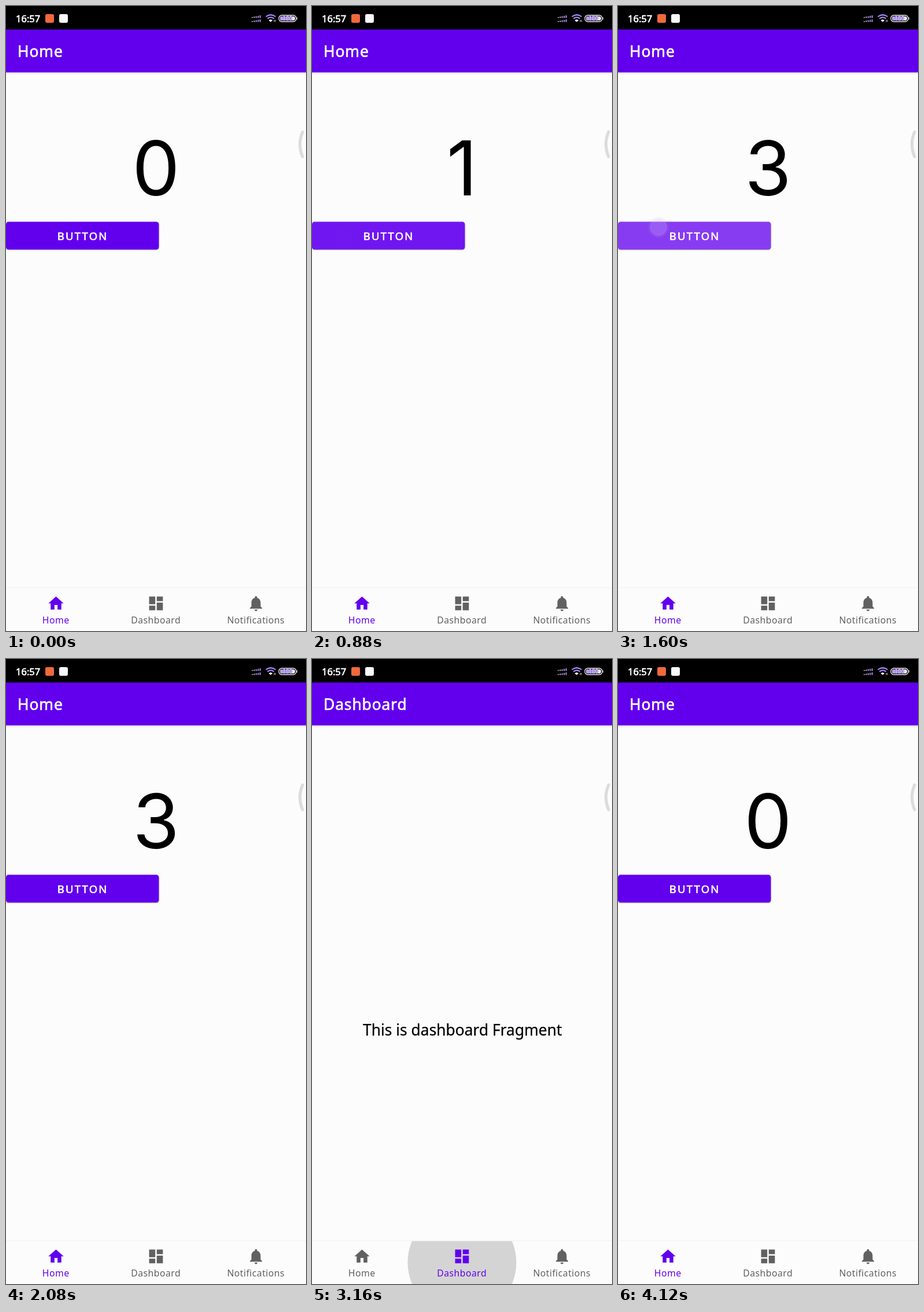
An HTML page for the animation above (4.68 s loop, 519 by 1079 pixels).

```html
<!DOCTYPE html>
<html lang="en">
<head>
<meta charset="utf-8">
<style>
html, body { margin: 0; width: 100%; height: 100%; overflow: hidden; background: #fcfcfc; }
svg { display: block; width: 519px; height: 1079px; font-family: "Noto Sans", sans-serif; }
.medium { fill: #fff; stroke: #fff; stroke-width: .7; }
#title { font-size: 26.4px; letter-spacing: .9px; }
#count { font: 130.6px Inter, sans-serif; text-anchor: middle; }
#message { font-size: 26.4px; stroke: #000; stroke-width: .25; }
.caption { font-size: 18.5px; letter-spacing: 2.2px; }
.tab { font-size: 15.86px; letter-spacing: .4px; text-anchor: middle; }
</style>
</head>
<body>
<svg viewBox="0 0 519 1079">
  <defs>
    <clipPath id="buttonClip"><rect y="372.5" width="264.5" height="48" rx="4.5"/></clipPath>
    <clipPath id="navClip"><rect y="1005" width="519" height="74"/></clipPath>
    <linearGradient id="shade" x2="0" y2="1">
      <stop stop-opacity=".12"/><stop offset="1" stop-opacity="0"/>
    </linearGradient>
    <filter id="soft"><feGaussianBlur stdDeviation="1"/></filter>
  </defs>
  <rect width="519" height="1079" fill="#fcfcfc"/>

  <g id="home">
    <text id="count" x="259.5" y="327.3">0</text>
    <rect y="374" width="264.5" height="47" rx="4.5" opacity=".3" filter="url(#soft)"/>
    <rect y="372.5" width="264.5" height="48" rx="4.5" fill="#6200ee"/>
    <g id="ripples" clip-path="url(#buttonClip)" fill="#fff"></g>
    <text class="medium caption" x="88.8" y="404">BUTTON</text>
    <g id="touches"></g>
  </g>
  <text id="message" x="88" y="649.5">This is dashboard Fragment</text>

  <rect y="114.6" width="519" height="4" fill="url(#shade)"/>
  <rect y="40" width="519" height="74.6" fill="#6200ee"/>
  <text id="title" class="medium" x="20" y="88">Home</text>

  <rect width="519" height="40.6"/>
  <text class="medium" x="17" y="28" font-size="16.5">16:57</text>
  <rect x="68" y="14" width="15" height="15" rx="3" fill="#f2693a"/>
  <rect x="92" y="14" width="15" height="15" rx="3" fill="#fafafa"/>
  <g id="signal"></g>
  <g fill="none" stroke="#a583f0" stroke-width="2.2">
    <path d="M449.5 18.5q8.5-6.5 17 0M452.3 21.8q5.7-4.4 11.4 0" />
    <path d="M455 24.8q2.8-2.2 5.6 0L457.8 27z" fill="#fff" stroke="#fff" stroke-width="1"/>
    <path d="M464 24v3.5m2-3.5v3.5" stroke="#ccc" stroke-width="1"/>
  </g>
  <rect x="472" y="16" width="30" height="11" rx="5" fill="none" stroke="#eee" stroke-width="1.3"/>
  <rect x="474" y="18" width="26" height="7" rx="3" fill="#f4f0fc"/>
  <rect x="474" y="18" width="20" height="7" rx="3" fill="#b79bf0"/>
  <path d="M503.4 19.5v4" stroke="#eee"/>
  <text x="487" y="25.3" font-size="10" text-anchor="middle" fill="#fff" stroke="#6a45b5" stroke-width="1" paint-order="stroke">100</text>

  <path d="M513 217.5Q504 239 513 260" fill="none" stroke="#dcdcdc" stroke-width="5.2" stroke-linecap="round"/>

  <rect y="1003.5" width="519" height="1.3" fill="#f4f4f4"/>
  <rect y="1005" width="519" height="74" fill="#fcfcfc"/>
  <g id="navRipples" clip-path="url(#navClip)"></g>
  <g id="tabs"></g>
</svg>
<script>
const LOOP = 4680, PURPLE = '#6200ee', GREY = '#616161';
const buttonTaps = [[520, 54, 399], [1040, 62, 382], [1390, 70, 382]];
const navTaps = [[2920, 259.5], [3560, 86.5]];
const SHOW_DASHBOARD = 3080, SHOW_HOME = 3720;
const icons = [
  ['Home', 86.5, 'M10 20v-6h4v6h5v-8h3L12 3 2 12h3v8z'],
  ['Dashboard', 259.5, 'M3 13h8V3H3zm0 8h8v-6H3zm10 0h8V11h-8zm0-18v6h8V3z'],
  ['Notifications', 432.5, 'M12 22c1.1 0 2-.9 2-2h-4c0 1.1.89 2 2 2zm6-6v-5c0-3.07-1.64-5.64-4.5-6.32V4c0-.83-.67-1.5-1.5-1.5s-1.5.67-1.5 1.5v.68C7.63 5.36 6 7.92 6 11v5l-2 2v1h16v-1z']
];

const $ = id => document.getElementById(id);
const set = (el, attrs) => { for (const k in attrs) el.setAttribute(k, attrs[k]); };
function add(parent, tag, attrs = {}) {
  const el = document.createElementNS('http://www.w3.org/2000/svg', tag);
  set(el, attrs);
  return parent.appendChild(el);
}
const progress = (t, start, length) => Math.min(1, Math.max(0, (t - start) / length));
const easeOut = p => 1 - (1 - p) ** 1.6;

for (let row = 0; row < 2; row++)
  for (let i = 0; i < 5; i++)
    add($('signal'), 'rect', {
      x: 425 + i * 3.4, y: 19 - i * .7 + row * 7, width: 2.2, height: 1.6 + i * .7,
      fill: i < 2 ? '#aaa6b5' : '#9b80d6'
    });

const tabs = icons.map(([name, x, d]) => {
  const tab = add($('tabs'), 'g');
  add(tab, 'path', { d, transform: `translate(${x - 15.86} 1015.5) scale(1.3217)` });
  add(tab, 'text', { class: 'tab', x: x - .3, y: 1065.5 }).textContent = name;
  return tab;
});
const ripples = buttonTaps.map(() => add($('ripples'), 'circle'));
const touches = buttonTaps.map(([, x, y]) => {
  const g = add($('touches'), 'g');
  add(g, 'circle', { cx: x, cy: y, r: 15.5, fill: 'none', stroke: '#bba8de', 'stroke-width': 3, opacity: .35, filter: 'url(#soft)' });
  add(g, 'circle', { cx: x, cy: y, r: 13.7, fill: '#c9a9fa', 'fill-opacity': .55, stroke: '#d8d0e6', 'stroke-opacity': .5 });
  return g;
});
const navRipples = navTaps.map(([, cx]) => add($('navRipples'), 'circle', { cx, cy: 1042, fill: '#000' }));

function draw(t) {
  const dashboard = t >= SHOW_DASHBOARD && t < SHOW_HOME;
  const active = dashboard ? 1 : 0;
  $('home').style.display = dashboard ? 'none' : '';
  $('message').style.display = dashboard ? '' : 'none';
  $('title').textContent = icons[active][0];
  tabs.forEach((tab, i) => set(tab, { fill: i === active ? PURPLE : GREY }));
  $('count').textContent = t >= SHOW_HOME ? 0 : buttonTaps.filter(([start]) => t >= start + 150).length;

  buttonTaps.forEach(([start, x, y], i) => {
    const p = easeOut(progress(t, start, 160));
    set(ripples[i], {
      cx: x + (132 - x) * p, cy: y + (397 - y) * p, r: 136 * p,
      opacity: .235 * (1 - progress(t, start + 220, 220))
    });
    set(touches[i], { opacity: progress(t, start, 40) * (1 - progress(t, start + 140, 260)) ** 2 });
  });
  navTaps.forEach(([start], i) => set(navRipples[i], {
    r: 94 * easeOut(progress(t, start, 200)),
    opacity: .16 * (1 - progress(t, start + 260, 240))
  }));
}

function frame() {
  draw(performance.now() % LOOP);
  requestAnimationFrame(frame);
}
frame();
</script>
</body>
</html>
```
